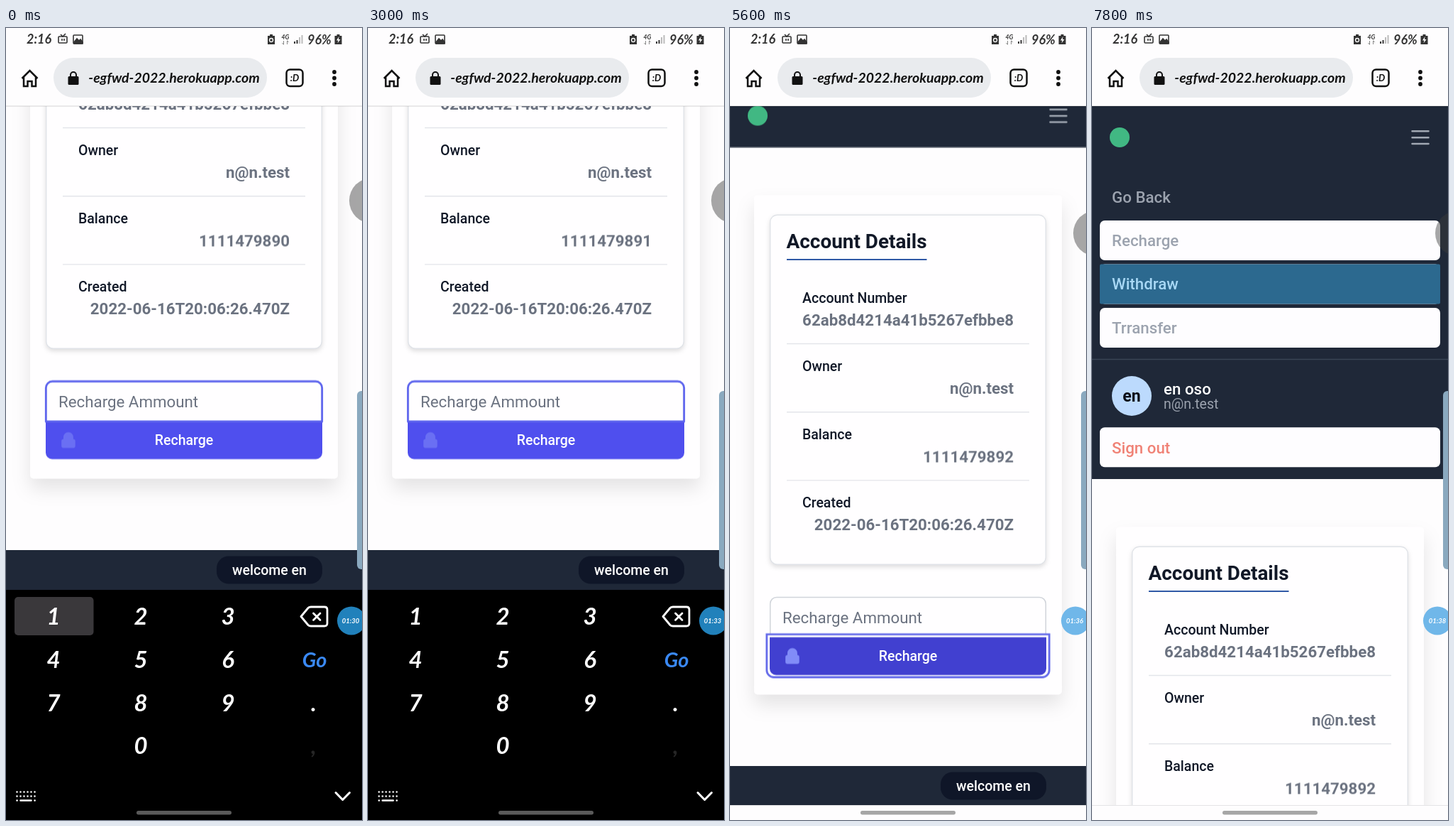
Animation, 502 px wide and 1115 px high, one loop 8 s. Source, as an HTML page:

```html
<!DOCTYPE html>
<html lang="en">
<head>
<meta charset="utf-8">
<title>Account recharge</title>
<style>
html, body { margin: 0; height: 100%; overflow: hidden; background: #fefdfe; }
#stage { display: block; width: 100vw; height: 100vh; font-family: Roboto, sans-serif; }

.hand { font-family: Lato, "Open Sans", sans-serif; font-style: italic; }
.label { font-size: 19.5px; font-weight: 500; fill: #111827; }
.value { font-size: 22.3px; font-weight: 700; fill: #6b7280; text-anchor: end; }
.item { font-size: 22.3px; font-weight: 500; fill: #9ca3af; }
.field { font-size: 22.3px; fill: #6b7280; }
.mid { text-anchor: middle; }
.navy { fill: #1f2838; }
.rule { stroke: #e3e5ea; stroke-width: 1.4; }
.panel { filter: drop-shadow(0 14px 13px rgb(0 0 0 / .1)); }
.card { filter: drop-shadow(0 3px 3px rgb(0 0 0 / .13)); }
.keys { font-size: 33px; font-weight: 700; fill: #fff; text-anchor: middle; }

/* One 8 s clock; every change is a hard step. */
.anim { animation: 8s step-end infinite; }
#page { animation-name: page; }
#body { animation-name: body; }
#menu { animation-name: menu; }
#hot { animation-name: hot; }
#pad { animation-name: pad; }
#press { animation-name: press; }
#empty { animation-name: empty; }
#typed { animation-name: typed; }
#caret { animation-name: caret; }
#focus { animation-name: focus; }
#ring { animation-name: ring; }
#balance { animation-name: balance; }
#clock { animation-name: clock; }
#bubble { animation-name: bubble; }
#handle { animation-name: handle; }

@keyframes page {
  0% { transform: translateY(-334.5px); }
  10% { transform: translateY(-30.5px); }
  37.5% { transform: translateY(-334.5px); }
  60% { transform: translateY(-30.5px); }
  75% { transform: translateY(-24px); }
  77.5% { transform: translateY(-10px); }
  80%, 100% { transform: translateY(0); }
}
@keyframes body {
  0% { transform: translateY(0); }
  85%, 100% { transform: translateY(436.5px); }
}
@keyframes menu { 0% { opacity: 0; } 85%, 100% { opacity: 1; } }
@keyframes hot { 0% { opacity: 0; } 97.5%, 100% { opacity: 1; } }
@keyframes pad {
  0%, 35% { transform: translateY(0); }
  10%, 60% { transform: translateY(150px); }
  12.5%, 62.5%, 100% { transform: translateY(324px); }
  32.5% { transform: translateY(120px); }
}
@keyframes press {
  0%, 50% { opacity: 1; }
  52.5% { opacity: .6; }
  2.5%, 55%, 100% { opacity: 0; }
}
@keyframes empty {
  0%, 15%, 65%, 100% { opacity: 1; }
  2.5%, 52.5% { opacity: 0; }
}
@keyframes typed {
  0%, 15%, 65%, 100% { opacity: 0; }
  2.5%, 52.5% { opacity: 1; }
}
@keyframes caret {
  0%, 7.5%, 35%, 42.5%, 60%, 100% { opacity: 0; transform: translateX(0); }
  2.5%, 52.5% { opacity: 1; transform: translateX(12.5px); }
  27.5%, 40% { opacity: 1; transform: translateX(0); }
}
@keyframes focus {
  0%, 27.5% { opacity: 1; }
  7.5%, 60%, 100% { opacity: 0; }
}
@keyframes ring {
  0%, 27.5% { opacity: 0; }
  7.5%, 60%, 100% { opacity: 1; }
}
@keyframes balance {
  0% { transform: translateY(0); }
  15% { transform: translateY(-30px); }
  65%, 100% { transform: translateY(-60px); }
}
@keyframes clock {
  0% { transform: translateY(0); }
  2.5% { transform: translateY(-20px); }
  15% { transform: translateY(-40px); }
  27.5% { transform: translateY(-60px); }
  42.5% { transform: translateY(-80px); }
  55% { transform: translateY(-100px); }
  70% { transform: translateY(-120px); }
  82.5% { transform: translateY(-140px); }
  92.5%, 100% { transform: translateY(-160px); }
}
@keyframes bubble {
  0%, 35% { fill: #2181bb; }
  12.5%, 62.5%, 100% { fill: #70b7e9; }
}
@keyframes handle {
  0%, 37.5% { transform: translateY(-46px); }
  10%, 60%, 100% { transform: translateY(0); }
}
</style>
</head>
<body>
<svg id="stage" viewBox="0 0 502 1115" preserveAspectRatio="none">
  <defs>
    <clipPath id="view"><rect y="110" width="502" height="984"/></clipPath>
    <path id="lock" d="M5 9V7a5 5 0 0110 0v2a2 2 0 012 2v5a2 2 0 01-2 2H5a2 2 0 01-2-2v-5a2 2 0 012-2zm8-2v2H7V7a3 3 0 016 0z"/>
    <rect id="slot" x="11" width="480" height="56" rx="7" fill="#fefdff"/>
  </defs>
  <rect width="502" height="1115" fill="#fefdfe"/>

  <g clip-path="url(#view)">
    <g id="page" class="anim">
      <g id="body" class="anim">
        <rect class="panel" x="34" y="266" width="434" height="703" rx="5" fill="#fffeff"/>
        <rect class="card" x="56.7" y="293.7" width="388.6" height="492" rx="10" fill="#fffeff" stroke="#e0e3e8" stroke-width="1.4"/>
        <text x="79.5" y="340" font-size="27.9" font-weight="700" fill="#111827">Account Details</text>
        <path d="M80 356.5H277.5" stroke="#3059a6" stroke-width="2"/>
        <path class="rule" d="M80 475H422M80 571.2H422M80 667.4H422"/>

        <g class="label">
          <text x="102" y="417">Account Number</text>
          <text x="102" y="513">Owner</text>
          <text x="102" y="609">Balance</text>
          <text x="102" y="705.3">Created</text>
        </g>
        <g class="value">
          <text x="400" y="449">62ab8d4214a41b5267efbbe8</text>
          <text x="400" y="545.3">n@n.test</text>
          <text x="400" y="737.7">2022-06-16T20:06:26.470Z</text>
          <svg x="250" y="621" width="160" height="28">
            <g id="balance" class="anim">
              <text x="150" y="20.5">1111479890</text>
              <text x="150" y="50.5">1111479891</text>
              <text x="150" y="80.5">1111479892</text>
            </g>
          </svg>
        </g>

        <path d="M56.7 890V841a9 9 0 0 1 9-9H436.300a9 9 0 0 1 9 9V890" fill="#fffeff" stroke="#d0d4da" stroke-width="1.5"/>
        <text id="empty" class="field anim" x="74" y="868.5">Recharge Ammount</text>
        <text id="typed" class="field anim" x="74" y="868.5" style="fill:#111827">1</text>
        <rect id="caret" class="anim" x="73.7" y="847.5" width="1.6" height="26" fill="#111"/>

        <path d="M56 888H446V932.500a9 9 0 0 1-9 9H65a9 9 0 0 1-9-9Z" fill="#4f4fee"/>
        <use href="#lock" transform="translate(74 900.7) scale(1.394)" fill="#6a6ff3"/>
        <path id="focus" class="anim" d="M56.300 888.300V841a9 9 0 0 1 9-9H436.700a9 9 0 0 1 9 9V888.300Z" fill="none" stroke="#5f66ee" stroke-width="2.8"/>
        <g id="ring" class="anim">
          <path d="M51.800 884.200H450.200V934.500a10 10 0 0 1-10 10H61.800a10 10 0 0 1-10-10Z" fill="#fff" stroke="#666cea" stroke-width="2.8"/>
          <path d="M56 888.200H446V932.500a9 9 0 0 1-9 9H65a9 9 0 0 1-9-9Z" fill="#4140d0"/>
          <use href="#lock" transform="translate(74 900.7) scale(1.394)" fill="#818cf8"/>
        </g>
        <text class="label mid" x="251" y="921.5" style="fill:#fff">Recharge</text>

        <rect class="navy" y="1069.500" width="502" height="56"/>
        <rect x="297" y="1078" width="149" height="39" rx="17" fill="#0f1628"/>
        <text class="label mid" x="371.5" y="1104" style="fill:#fff">welcome en</text>
      </g>

      <rect class="navy" y="110" width="502" height="88.500"/>
      <g id="menu" class="anim">
        <rect class="navy" y="198" width="502" height="437"/>
        <use href="#slot" y="271"/>
        <use href="#slot" y="332.500"/>
        <use href="#slot" y="394"/>
        <use href="#slot" y="562.300"/>
        <g class="item">
          <text x="28" y="245.500">Go Back</text>
          <text x="28" y="307">Recharge</text>
          <text x="28" y="368">Withdraw</text>
          <text x="28" y="429.500">Trransfer</text>
          <text x="28" y="598.500" style="fill:#f08276">Sign out</text>
          <g id="hot" class="anim">
            <rect x="11" y="332.500" width="480" height="56" rx="2" fill="#2c698f"/>
            <text x="28" y="368" style="fill:#a8d8f5">Withdraw</text>
          </g>
          <text x="101" y="516" style="fill:#fff">en oso</text>
        </g>
        <path d="M0 466.500H502" stroke="#3a4454" stroke-width="1.4"/>
        <circle cx="56" cy="518" r="28" fill="#bcdafd"/>
        <text class="mid" x="56" y="526" font-size="23" font-weight="700" fill="#0b0f18">en</text>
        <text x="101" y="535.500" font-size="19.500" fill="#9ca3af">n@n.test</text>
      </g>
      <circle cx="39" cy="154" r="14" fill="#41b883"/>
      <path d="M451.500 145.300H474.500M451.500 154.200H474.500M451.500 163.100H474.500" stroke="#a1a8b3" stroke-width="2.500" stroke-linecap="round"/>
    </g>
  </g>

  <!-- Status and address bars -->
  <rect width="502" height="110" fill="#fefdfe"/>
  <path d="M0 110H502" stroke="#000" stroke-opacity=".17"/>
  <g class="hand" fill="#333" font-weight="700">
    <text x="29" y="22" font-size="18">2:16</text>
    <text x="425" y="22.500" font-size="18">96%</text>
    <text x="388.500" y="16" font-size="8.500">4G</text>
  </g>
  <g fill="none" stroke="#333" stroke-width="1.600">
    <rect x="74" y="12" width="12" height="9" rx="1"/>
    <path d="M77 9L80 12L84 8M79 15V18M82 15V18"/>
    <rect x="95" y="10" width="13" height="12" rx="1"/>
    <path d="M96 20L100 15L103 18L105 16L108 20V22H96Z" fill="#333"/>
    <path d="M391.500 18V23M389.500 21L391.500 23.500M396.500 23V18M398.500 20L396.500 17.500" stroke="#888" stroke-width="1"/>
    <path d="M407 19V22M410.500 17V22" stroke-width="2"/>
    <path d="M414 13V22M417.500 10V22" stroke="#bbb" stroke-width="2"/>
  </g>
  <g fill="#333">
    <path d="M369 11h3v-2h4v2h3v12h-10zM463.500 11h3v-2h4v2h3v12h-10z"/>
    <circle cx="374" cy="17" r="2.500" fill="none" stroke="#fff" stroke-width="1.300"/>
    <path d="M469.500 12L466 17.500H468.500L467.500 21.500L471.500 16H469Z" fill="#fff"/>
  </g>
  <rect x="67" y="42" width="301" height="56" rx="28" fill="#e9ebee"/>
  <g fill="none" stroke="#111" stroke-width="2.500">
    <path d="M22.500 71L33.500 60L44.500 71M25 69V82H30.500V75H36.500V82H42V69"/>
    <rect x="395.500" y="58.500" width="23" height="23.500" rx="5"/>
    <path d="M91 69V66a4 4 0 0 1 8 0V69" stroke-width="2"/>
  </g>
  <g fill="#111">
    <rect x="87.500" y="68" width="15" height="12" rx="1.500"/>
    <circle cx="463" cy="62" r="2.900"/>
    <circle cx="463" cy="70.500" r="2.900"/>
    <circle cx="463" cy="79" r="2.900"/>
    <g class="hand mid">
      <text x="237" y="77" font-size="19.500" font-weight="700">-egfwd-2022.herokuapp.com</text>
      <text x="407" y="75" font-size="13" font-weight="700">:D</text>
    </g>
  </g>

  <rect y="1094" width="502" height="21" fill="#fefdfe"/>
  <path d="M0 1094.500H502" stroke="#e4e4e6"/>

  <!-- Number pad -->
  <g id="pad" class="anim">
    <rect y="791" width="502" height="324"/>
    <rect id="press" class="anim" x="12" y="801" width="111.500" height="54" rx="5" fill="#3a383b"/>
    <g class="hand keys">
      <text y="840"><tspan x="67">1</tspan><tspan x="190">2</tspan><tspan x="313">3</tspan></text>
      <text y="901"><tspan x="67">4</tspan><tspan x="190">5</tspan><tspan x="313">6</tspan></text>
      <text y="962"><tspan x="67">7</tspan><tspan x="190">8</tspan><tspan x="313">9</tspan><tspan x="434">.</tspan></text>
      <text y="1022"><tspan x="190">0</tspan><tspan x="434" fill="#262626">,</tspan></text>
      <text x="435" y="900" font-size="29" fill="#3a89f5">Go</text>
    </g>
    <g fill="none" stroke="#fff" stroke-width="2.800" stroke-linejoin="round" stroke-linecap="round">
      <path d="M416 828.500L426 816.500Q427.500 815 430 815H449Q453 815 453 819V838Q453 842 449 842H430Q427.500 842 426 840.500Z"/>
      <path d="M433.500 824L443 833.500M443 824L433.500 833.500"/>
      <path d="M465 1076.500L474.700 1086.500L484.500 1076.500" stroke-width="3"/>
      <path d="M15.500 1075.500H42M15.500 1081.500H42" stroke-width="2.600" stroke-dasharray="0 5"/>
      <path d="M15.500 1087.500H15.600M20.500 1087.500H35.500M40.500 1087.500H40.600" stroke-width="2.600"/>
    </g>
  </g>
  <rect x="184" y="1102" width="134" height="5.500" rx="2.700" fill="#808080" fill-opacity=".7"/>

  <!-- Floating controls -->
  <circle id="handle" class="anim" cx="516" cy="289" r="32" fill="#3c3c3c" fill-opacity=".45"/>
  <rect x="495" y="511" width="20" height="251" rx="6" fill="#8aa9bf"/>
  <circle id="bubble" class="anim" cx="487" cy="834.500" r="20"/>
  <svg x="467" y="826" width="40" height="17">
    <g id="clock" class="anim hand mid" font-size="9.500" font-weight="700" fill="#fff">
      <text y="12">
        <tspan x="20">01:30</tspan>
        <tspan x="20" dy="20">01:31</tspan>
        <tspan x="20" dy="20">01:32</tspan>
        <tspan x="20" dy="20">01:33</tspan>
        <tspan x="20" dy="20">01:34</tspan>
        <tspan x="20" dy="20">01:35</tspan>
        <tspan x="20" dy="20">01:36</tspan>
        <tspan x="20" dy="20">01:37</tspan>
        <tspan x="20" dy="20">01:38</tspan>
      </text>
    </g>
  </svg>
</svg>
</body>
</html>
```
